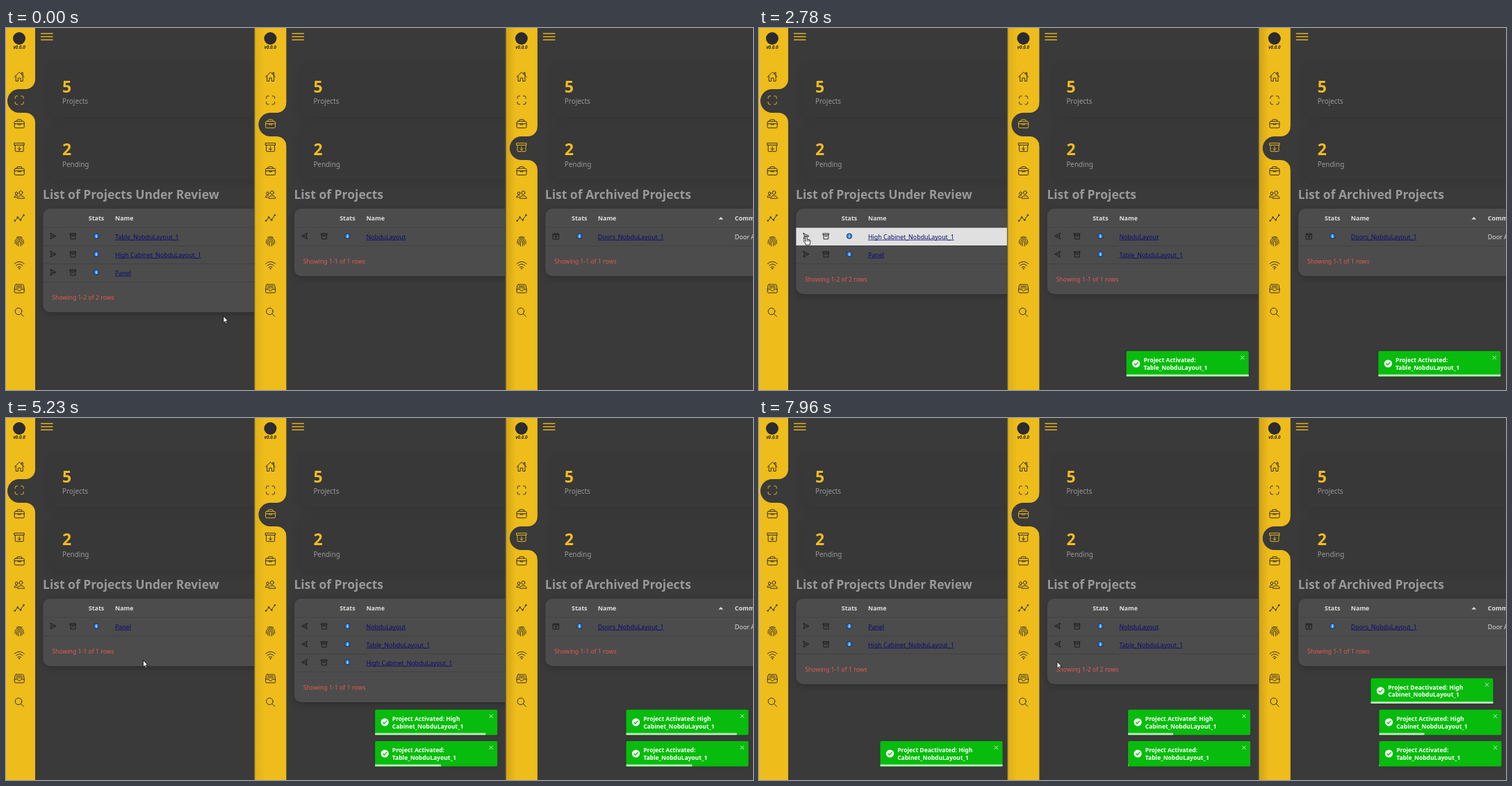
An HTML page with a canvas that plays this animation: 1075x521 px, repeating every 8000 ms.

```html
<!DOCTYPE html>
<html lang="en">
<head>
<meta charset="utf-8">
<title>Project lists</title>
<style>
html, body { margin: 0; width: 100%; height: 100%; overflow: hidden; background: #3a3a3a; }
canvas { display: block; width: 1075px; height: 521px; }
</style>
</head>
<body>
<canvas id="stage"></canvas>
<script>
const W = 1075, H = 521, LOOP = 8000, STEP = 361.4;
const BG = '#3a3a3a', YELLOW = '#eebc1b', INK = '#2b2b2b', GREEN = '#07bc0c';
const canvas = document.getElementById('stage'), ctx = canvas.getContext('2d');
const ratio = window.devicePixelRatio || 1;
canvas.width = W * ratio;
canvas.height = H * ratio;

const TABLE = 'Table_NobduLayout_1', CABINET = 'High Cabinet_NobduLayout_1';
const CLICKS = [2110, 3900, 7420];
const ONE = 'Showing 1-1 of 1 rows', TWO = 'Showing 1-2 of 2 rows';

// One entry per stage of the story: rows and footer of the first two tables.
const REVIEW = [
  [[TABLE, CABINET, 'Panel'], TWO], [[CABINET, 'Panel'], TWO],
  [['Panel'], ONE], [['Panel', CABINET], ONE]
];
const ACTIVE = [
  [['NobduLayout'], ONE], [['NobduLayout', TABLE], ONE],
  [['NobduLayout', TABLE, CABINET], ONE], [['NobduLayout', TABLE], TWO]
];
const ARCHIVED = [['Doors_NobduLayout_1'], ONE];

// Slide-in times per panel, stack slot, and time the progress bar starts.
const TOASTS = [
  { text: ['Project Activated:', TABLE], start: { 1: 2150, 2: 2135 }, slot: 0, bar: 2880 },
  { text: ['Project Activated: High', 'Cabinet_NobduLayout_1'], start: { 1: 4010, 2: 4010 }, slot: 1, bar: 4742 },
  { text: ['Project Deactivated: High', 'Cabinet_NobduLayout_1'], start: { 0: 7435, 2: 7540 }, slot: { 0: 0, 2: 2 }, bar: 8170 }
];

const PATH = [
  [0, 313, 415], [400, 313, 415], [750, 230, 377], [1000, 140, 338], [1200, 90, 314],
  [1310, 80, 309], [1500, 68, 300], [4780, 68, 300], [4950, 100, 314], [5230, 197, 349],
  [5570, 360, 372], [5900, 418, 368], [6250, 430, 351], [7420, 430, 351], [7700, 429, 351], [8000, 429, 351]
];
const BOUNCE = [[0, 1500], [.6, -12.5], [.75, 5], [.9, -2.5], [1, 0]];

const icon = d => new Path2D(d);
const briefcase = icon('M-5.5-3.5H5.5Q7-3.5 7-2V4.5Q7 6 5.5 6H-5.5Q-7 6-7 4.5V-2Q-7-3.5-5.5-3.5ZM-3.5-3.5V-4.5Q-3.5-6-2-6H2Q3.5-6 3.5-4.5V-3.5M-7 0H7M-2 0V1.2H2V0');
const MENU = [
  icon('M-5-1V6.5H-1.8V2H1.8V6.5H5V-1M-7 .5L0-6.5L7 .5M3.2-3.5V-6H5V-1.7'),
  icon('M-6-2.5V-4Q-6-6-4-6H-2.5M2.5-6H4Q6-6 6-4V-2.5M6 2.5V4Q6 6 4 6H2.5M-2.5 6H-4Q-6 6-6 4V2.5'),
  briefcase,
  icon('M-7-6H7V-3.2H-7ZM-6-3.2V5Q-6 6-5 6H5Q6 6 6 5V-3.2M0-1V4M-2.3 1.8L0 4L2.3 1.8'),
  briefcase,
  icon('M4.7-2.5A2.4 2.6 0 1 1-.1-2.5A2.4 2.6 0 1 1 4.7-2.5ZM-2.6 5.3C-2.6 .6 7.2 .6 7.2 5.3ZM-2.2-1.6A1.8 2 0 1 1-5.8-1.6A1.8 2 0 1 1-2.2-1.6ZM-2.6 2.2C-5-.1-7.2 2-7.2 4.2H-3.6'),
  icon('M-5.7 3.3L-2.6-.4L1.6 2.6L5.8-3.3M-5.6 4A.9.9 0 1 1-7.4 4A.9.9 0 1 1-5.6 4M-1.6-1A.9.9 0 1 1-3.4-1A.9.9 0 1 1-1.6-1M2.6 3A.9.9 0 1 1 .8 3A.9.9 0 1 1 2.6 3M7.2-4A.9.9 0 1 1 5.4-4A.9.9 0 1 1 7.2-4'),
  icon('M-4-6Q0-8 4-6M-6 3V0A6 5 0 0 1 6 0V3M-3.8 5V0A3.8 2.9 0 0 1 3.8 0V5M-1.6 6.5V.7A1.6 1.5 0 0 1 1.6 .7V6.5'),
  icon('M-7-2Q0-8 7-2M-4.7 .6Q0-3.5 4.7 .6M-2.4 3.1Q0 1 2.4 3.1M.7 5A.7.7 0 1 1-.7 5A.7.7 0 1 1 .7 5'),
  icon('M-4.5-6H4.5Q6-6 6.2-4.5L7 1V4.5Q7 6 5.5 6H-5.5Q-7 6-7 4.5V1L-6.2-4.5Q-6-6-4.5-6ZM-7 1H-2.5Q-2 3.2 0 3.2T2.5 1H7M-4-3.6H4M-4.6-1.2H4.6'),
  icon('M3.6-1.2A4.8 4.8 0 1 1-6-1.2A4.8 4.8 0 1 1 3.6-1.2ZM2.3 2.3L6.3 6.3')
];
const SEND = icon('M-4-4.2L4 0L-4 4.2L-2.6 0ZM-2.6 0H1'), BOX = icon('M-4-4H4V-2H-4ZM-3.4-2V4H3.4V-2M-1.4 0H1.4');
const UNBOX = icon('M-4-4H4V4H-4ZM-4-2.3H4M0 2.8V-.8M-1.7 .8L0-.9L1.7 .8');
const CURSORS = {
  arrow: icon('M0 0V9.2L2.1 7.3L3.5 10.4L5 9.8L3.6 6.7H6.5Z'),
  hand: icon('M-1.1 .3Q0-1 1.1 .3V4L5 5Q6.2 5.4 6 7L5.3 10V12H-.8V10.5L-3.6 6.8Q-3.7 5.2-2.3 6L-1.1 7.2Z'),
  resize: icon('M-6.5 0L-3.4-3V-1H3.4V-3L6.5 0L3.4 3V1H-3.4V3Z')
};

function between(points, t, ease = p => p) {
  let i = 1;
  while (i < points.length - 1 && t > points[i][0]) i++;
  const a = points[i - 1], b = points[i];
  const p = ease(Math.min(1, Math.max(0, (t - a[0]) / (b[0] - a[0]))));
  return a.slice(1).map((v, k) => v + (b[k + 1] - v) * p);
}

function rect(x, y, w, h, fill) {
  ctx.fillStyle = fill;
  ctx.fillRect(x, y, w, h);
}

function rounded(x, y, w, h, r, fill) {
  ctx.fillStyle = fill;
  ctx.beginPath();
  ctx.roundRect(x, y, w, h, r);
  ctx.fill();
}

function shadowed(color, blur, dy, draw) {
  ctx.save();
  ctx.shadowColor = color;
  ctx.shadowBlur = blur * ratio;
  ctx.shadowOffsetY = dy * ratio;
  draw();
  ctx.restore();
}

function disc(x, y, r, fill) {
  ctx.fillStyle = fill;
  ctx.beginPath();
  ctx.arc(x, y, r, 0, 7);
  ctx.fill();
}

function text(str, x, y, font, fill, align = 'left') {
  ctx.font = font + ' "Noto Sans", "Open Sans", sans-serif';
  ctx.fillStyle = fill;
  ctx.textAlign = align;
  ctx.fillText(str, x, y);
}

function glyph(path, x, y, stroke, width = 1, fill = null, flip = 1) {
  ctx.save();
  ctx.translate(x, y);
  ctx.scale(flip, 1);
  ctx.lineWidth = width;
  ctx.lineJoin = ctx.lineCap = 'round';
  ctx.strokeStyle = stroke;
  if (fill) {
    ctx.fillStyle = fill;
    ctx.fill(path);
  }
  ctx.stroke(path);
  ctx.restore();
}

function sidebar(panel) {
  const left = panel ? -3.4 : 0, top = 88 + panel * 34, r = 14;
  rect(left, 0, 42 - left, H, YELLOW);
  if (panel) {
    const shade = ctx.createLinearGradient(left, 0, left + 14, 0);
    shade.addColorStop(0, `rgba(120,85,0,${panel * .12})`);
    shade.addColorStop(1, 'rgba(120,85,0,0)');
    rect(left, 0, 14, H, shade);
    rect(left - 1, 0, 1.3, H, '#64604f');
  }
  // The current entry is a tab of background with flared corners.
  ctx.fillStyle = BG;
  ctx.beginPath();
  ctx.moveTo(43, top - r);
  ctx.lineTo(42, top - r);
  ctx.arc(42 - r, top - r, r, 0, Math.PI / 2);
  ctx.lineTo(19, top);
  ctx.arc(19, top + 17, 17, -Math.PI / 2, Math.PI / 2, true);
  ctx.lineTo(42 - r, top + 34);
  ctx.arc(42 - r, top + 34 + r, r, -Math.PI / 2, 0);
  ctx.lineTo(43, top + 34 + r);
  ctx.fill();

  disc(19, 15, 9, '#2b2b30');
  text('v0.0.0', 19, 29.5, 'italic 700 6.3px', INK, 'center');
  MENU.forEach((path, i) => glyph(path, 19.2, 70 + i * 33.9, i === panel + 1 ? YELLOW : INK, .95));
  for (const y of [8, 12.5, 17]) rect(50, y - .7, 17.5, 1.4, YELLOW);
}

function card(y, count, label) {
  shadowed('rgba(0,0,0,.1)', 14, 4, () => rounded(62, y, 420, 76, 11, '#383838'));
  text(count, 81, y + 40.8, '600 23px', '#f0bb22');
  text(label, 81, y + 57, '9.9px', '#999');
}

// Draws a table and returns the pointer shape for a pointer at (px, py).
function table(panel, title, rows, footer, px, py) {
  const archived = panel === 2, nameX = archived ? 129 : 157, infoX = archived ? 102.5 : 130;
  const end = 287 + rows.length * 26;
  let shape = 'arrow';
  text(title, 53, 246, '700 17.5px', '#999');
  shadowed('rgba(0,0,0,.2)', 10, 3, () => rounded(53.4, 260, 420, end + 44 - 260, 10, '#4c4c4c'));
  text('Stats', infoX, 277, '700 8.9px', '#dedede', 'center');
  text('Name', nameX, 277, '700 8.9px', '#dedede');
  rect(53.4, 286.5, 420, 1, '#424242');
  if (archived) {
    ctx.fillStyle = '#ddd';
    ctx.fill(icon('M302.5 275.5L306 272L309.5 275.5Z'));
    text('Comment', 326, 277, '700 8.9px', '#dedede');
  }
  rows.forEach((name, i) => {
    const top = 287 + i * 26, mid = top + 12.5;
    const hover = px >= 53 && px < 357 && py >= top && py < top + 26;
    if (hover) rect(53.4, top + .5, 420, 26, '#e0e0e0');
    rect(53.4, top + 26, 420, 1, '#414141');
    if (archived) {
      glyph(UNBOX, 68.7, mid + .5, '#171717', .9);
      text('Door Assembly', 326, top + 16.5, '8.9px', '#dedede');
    } else {
      glyph(SEND, 68, mid, '#171717', .9, null, panel ? -1 : 1);
      glyph(BOX, 96.4, mid + .3, '#171717', .9);
    }
    disc(infoX, mid, 3.9, '#12264a');
    disc(infoX, mid, 3.2, '#2b7fe3');
    rect(infoX - .6, mid - 2.2, 1.2, 1.1, '#fff');
    rect(infoX - .6, mid - .6, 1.2, 2.8, '#fff');
    text(name, nameX, top + 16.5, '8.9px', '#0c0c70');
    const width = ctx.measureText(name).width;
    rect(nameX, top + 17.7, width, .8, '#0c0c70');
    if (hover) {
      if (Math.abs(px - 80) < 4) shape = 'resize';
      else if ([68, 96, infoX].some(x => Math.abs(px - x) < 6) || (px > nameX && px < nameX + width)) shape = 'hand';
    }
  });
  text(footer, 66.3, end + 26, '8.7px', '#e25a52');
  return shape;
}

function toast(panel, { text: lines, start, slot, bar }, t) {
  const age = t - start[panel];
  if (!(age >= 0)) return;
  const [shift] = between(BOUNCE, age / 700, p => 1 - (1 - p) ** 3);
  const x = 169.7 + shift, y = 465 - 45.2 * (slot[panel] ?? slot);
  shadowed('rgba(0,0,0,.12)', 5, 1, () => rounded(x, y, 176, 36.4, 2, GREEN));
  disc(x + 14, y + 18, 5.6, '#fff');
  glyph(icon('M-2.5 .2L-.7 2L2.7-1.7'), x + 14, y + 18, GREEN, 1.3);
  lines.forEach((line, i) => text(line, x + 24.7, y + 16.4 + i * 10.4, '600 8.5px', '#fff'));
  glyph(icon('M-2.3-2.3L2.3 2.3M2.3-2.3L-2.3 2.3'), x + 167, y + 9.4, '#c3efc4', 1);
  const left = Math.max(0, Math.min(1, 1 - (t - bar) / 5100));
  rect(x, y + 33.6, 176 * left, 2.8, '#b9ecba');
}

function draw(t) {
  const stage = CLICKS.filter(c => t >= c).length;
  const [px, py] = between(PATH, t);
  const tables = [
    ['List of Projects Under Review', ...REVIEW[stage]],
    ['List of Projects', ...ACTIVE[stage]],
    ['List of Archived Projects', ...ARCHIVED]
  ];
  let shape = 'arrow';
  ctx.setTransform(ratio, 0, 0, ratio, 0, 0);
  rect(0, 0, W, H, BG);
  tables.forEach((content, panel) => {
    const ox = panel * STEP;
    ctx.save();
    ctx.translate(ox, 0);
    ctx.beginPath();
    ctx.rect(-4.5, 0, STEP, H);
    ctx.clip();
    card(52, '5', 'Projects');
    card(142.5, '2', 'Pending');
    const over = table(panel, ...content, px - ox, py);
    if (over !== 'arrow') shape = over;
    sidebar(panel);
    TOASTS.forEach(item => toast(panel, item, t));
    ctx.restore();
  });
  glyph(CURSORS[shape], px, py, '#111', .8, '#fff');
  if (shape === 'hand') glyph(icon('M1.1 4V7M2.8 4.8V7M4.4 5.2V7'), px, py, '#111', .6);
}

function frame(now) {
  draw(now % LOOP);
  requestAnimationFrame(frame);
}
requestAnimationFrame(frame);
</script>
</body>
</html>
```
